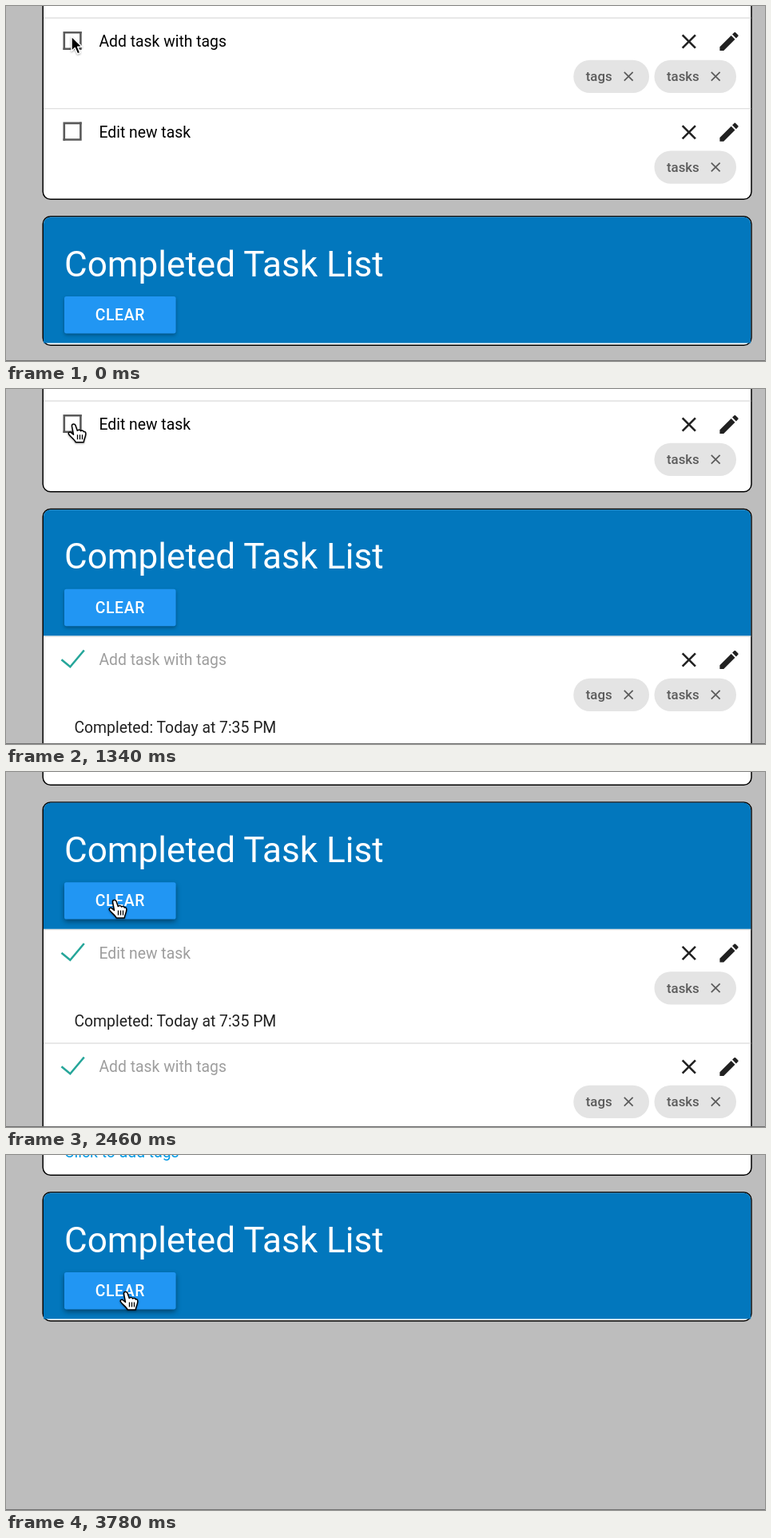
An HTML page for the animation above (3.8 s loop, 950 by 445 pixels).

```html
<!DOCTYPE html>
<html lang="en">
<head>
<meta charset="utf-8">
<title>Task list</title>
<style>
  html, body { margin: 0; width: 100%; height: 100%; overflow: hidden; background: #bdbdbd; }
  svg { display: block; }
  text { font: 19.35px Roboto, sans-serif; white-space: pre; }
  .card { stroke: #000; stroke-width: 1.5; }
  .title { font-size: 44.1px; fill: #fff; }
  .clear { font-weight: 500; letter-spacing: .65px; fill: #fff; }
  .chip { font-size: 16.77px; font-weight: 500; fill: #5b5b5b; }
  .button { fill: #2196f3; filter: drop-shadow(0 2px 2px rgba(0,0,0,.32)); }
  .hover { filter: drop-shadow(0 3px 3px rgba(0,0,0,.42)); }
  .cursor { filter: drop-shadow(0 1px 1px rgba(0,0,0,.35)); }
</style>
</head>
<body>
<svg id="stage" width="950" height="445" viewBox="0 0 950 445"></svg>
<script>
const LOOP = 3800, UNIT = 1.29;
const FIRST_CHECK = 220, FIRST_MOVE = 660, SECOND_CHECK = 1440, SECOND_MOVE = 1900;
const RIPPLE = 2990, CLEARED = 3260;
const CLOSE = 'M19 6.41 17.59 5 12 10.59 6.41 5 5 6.41 10.59 12 5 17.59 6.41 19 12 13.41 17.59 19 19 17.59 13.41 12z';
const EDIT = 'M3 17.25V21h3.75L17.81 9.94l-3.75-3.75zM20.71 7.04c.39-.39.39-1.02 0-1.41l-2.34-2.34c-.39-.39-1.02-.39-1.41 0l-1.83 1.83 3.75 3.75z';
const ARROW = 'M0 0V18.5L4.2 14.6 7.5 22 10.8 20.6 7.7 13.3H13.3Z';
const HAND = 'M-2.5 2C-3-1 1-1.5 2 1L4.3 7.5C6 6 8 6.5 8.5 8C10 7 12 7.5 12.3 9C14 8.5 15 9.5 14.8 12C14.6 16 12.5 18 12.3 22H2.2C.5 18-5 15-6.5 12C-7.5 10-5 8.5-3.5 10L-.5 12.5Z';
const CURSOR_PATH = [
  [0, 82, 38], [300, 82, 38], [700, 85, 45], [1300, 85, 45], [1450, 85, 43],
  [1900, 85, 43], [2350, 136, 161], [2650, 136, 161], [2880, 150, 172], [LOOP, 150, 172]
];

const stage = document.getElementById('stage');
const clamp = v => Math.min(1, Math.max(0, v));
const progress = (t, start, length) => clamp((t - start) / length);
const smooth = p => p * p * (3 - 2 * p);
const mix = (a, b, p) => a + (b - a) * p;

const text = (x, y, content, attrs = '') => `<text x="${x}" y="${y}" ${attrs}>${content}</text>`;
const icon = (path, x, y, scale, fill) =>
  `<path d="${path}" fill="${fill}" transform="translate(${x} ${y}) scale(${scale}) translate(-12 -12)"/>`;
const card = (top, bottom, fill) =>
  `<rect class="card" x="46.2" y="${top + .75}" width="886.8" height="${bottom - top - 1.5}" rx="9.5" fill="${fill}"/>`;
const rule = y => `<path d="M47 ${y}H932.3" stroke="#e0e0e0" stroke-width="1.3"/>`;

// The square box narrows, turns 40 degrees and loses two sides to become a tick.
function checkbox(p) {
  const x = mix(71.5, 65, p), y = mix(31.9, 26.7, p);
  const right = x + mix(23.2, 15.5, p), bottom = y + mix(23.2, 28.4, p);
  const pivot = mix(.5, 1, p);
  const l = x + 1.3, u = y + 1.3, r = right - 1.3, d = bottom - 1.3;
  const color = `rgb(${mix(90, 38, p)},${mix(90, 166, p)},${mix(90, 154, p)})`;
  return `<g fill="none" stroke-width="2.6" transform="rotate(${40 * p} ${mix(x, right, pivot)} ${mix(y, bottom, pivot)})">
    <path d="M${l} ${bottom}V${u}H${right}" stroke="#5a5a5a" opacity="${1 - p}"/>
    <path d="M${r} ${y}V${d}H${x}" stroke="${color}"/></g>`;
}

function chip(right, label, textWidth) {
  const width = textWidth + 48 * UNIT, x = right - width;
  return `<rect x="${x}" y="67.7" width="${width}" height="41.3" rx="20.6" fill="#e4e4e4"/>`
    + text(x + 15.5, 94, label, 'class="chip"')
    + icon(CLOSE, right - 25.8, 88.3, .86, '#5b5b5b');
}

function task(y, name, checked, done) {
  return `<g transform="translate(0 ${y})">` + rule(15) + checkbox(checked)
    + text(116.5, 51, name, `fill="${done ? '#9e9e9e' : '#000'}"`)
    + icon(CLOSE, 854.8, 44.5, UNIT, '#212121') + icon(EDIT, 905, 44.5, UNIT, '#212121')
    + chip(914, 'tasks', 40.6)
    + (name === 'Add task with tags' ? chip(805, 'tags', 32.8) : '')
    + (done ? text(85.5, 136, 'Completed: Today at 7:35 PM', 'fill="#212121"') : '')
    + '</g>';
}

function ripple(t) {
  const p = progress(t, RIPPLE, 350);
  const radius = 92 * (1 - (1 - p) ** 2);
  const alpha = mix(.12, .27, progress(t, 3080, 160)) * (1 - progress(t, 3270, 430));
  return `<svg x="73" y="101" width="139.6" height="46.4">
    <circle cx="78" cy="30.5" r="${radius}" fill="#fff" opacity="${alpha}"/></svg>`;
}

function completedList(t, top, bottom, tasks = '') {
  const hover = t > 2250 ? 'hover' : '';
  return card(top, bottom, '#fff') + tasks + `<g transform="translate(0 ${top})">
    <path d="M47 159.5V10.2a8.8 8.8 0 0 1 8.8-8.8H923.4a8.8 8.8 0 0 1 8.8 8.8V159.5Z" fill="#0277bd"/>
    ${text(73, 75.5, 'Completed Task List', 'class="title"')}
    <rect class="button ${hover}" x="73" y="101" width="139.6" height="46.4" rx="2.6"/>
    ${ripple(t)}${text(111.7, 130.8, 'CLEAR', 'class="clear"')}</g>`;
}

function lists(t) {
  const add = 'Add task with tags', edit = 'Edit new task';
  const tick = start => smooth(progress(t, start, 200));
  if (t < FIRST_MOVE)
    return card(-30, 243, '#fff') + task(0, add, tick(FIRST_CHECK)) + task(113.7, edit, 0)
      + completedList(t, 263, 426);
  if (t < SECOND_MOVE)
    return card(-30, 129.5, '#fff') + task(0, edit, tick(SECOND_CHECK))
      + completedList(t, 149.8, 500, task(295, add, 1, true));
  if (t < CLEARED)
    return card(-30, 17, '#fff')
      + completedList(t, 37.2, 600, task(182.5, edit, 1, true) + task(325, add, 1, true));
  return card(-30, 26, '#fff') + text(73, 3, 'Click to add tags', 'fill="#039be5"')
    + completedList(t, 46, 208.7);
}

function cursor(t) {
  const i = CURSOR_PATH.findIndex(k => k[0] > t);
  const [t0, x0, y0] = CURSOR_PATH[i - 1], [t1, x1, y1] = CURSOR_PATH[i];
  const p = smooth(progress(t, t0, t1 - t0));
  const x = mix(x0, x1, p), y = mix(y0, y1, p);
  const hand = t >= FIRST_MOVE && t < SECOND_CHECK || y > 137;
  return `<g class="cursor" transform="translate(${x} ${y})" stroke-linejoin="round">` + (hand
    ? `<path d="${HAND}" fill="#fff" stroke="#000" stroke-width="1.5"/>
       <path d="M4.5 12.5v6m3-6v6m3-6v6" stroke="#000" stroke-width="1.3"/>`
    : `<path d="${ARROW}" stroke="#fff" stroke-width="1.5"/>`) + '</g>';
}

function draw() {
  const t = performance.now() % LOOP;
  stage.innerHTML = lists(t) + '<path d="M0 444.5H950" stroke="#707070"/>' + cursor(t);
  requestAnimationFrame(draw);
}
draw();
</script>
</body>
</html>
```
